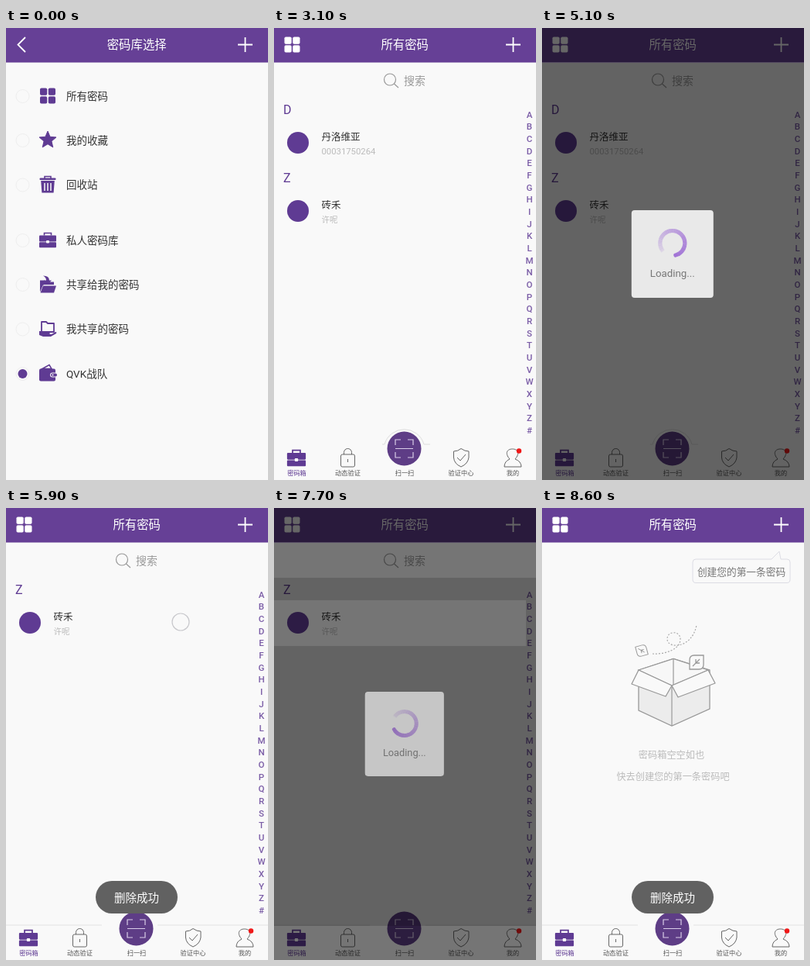
Write an HTML page that moves like this. It is 339 px wide and 583 px high and loops after 9.5 s.

```html
<!DOCTYPE html>
<html lang="zh-CN">
<head>
<meta charset="utf-8">
<title>密码库</title>
<style>
html, body { margin: 0; width: 100%; height: 100%; overflow: hidden; background: #f9f9f9; }
svg { display: block; width: 100%; height: 100%; }
text { font-family: Roboto, "Noto Sans CJK SC", "Noto Sans CJK", sans-serif; }
</style>
</head>
<body>
<svg id="stage" viewBox="0 0 339 583"></svg>
<script>
const LOOP = 9500;
const PURPLE = '#664096', INK = '#5f3b93', DARK = '#333', GREY = '#bbb';
const OPEN_SHIFT = 138, SWIPE_TIME = 437;

// Markup helpers
const text = (x, cy, size, fill, str, anchor = 'start', extra = '') =>
  `<text x="${x}" y="${cy + size * 0.365}" font-size="${size}" fill="${fill}" text-anchor="${anchor}" ${extra}>${str}</text>`;
const mid = (x, cy, size, fill, str, extra) => text(x, cy, size, fill, str, 'middle', extra);
const rect = (x, y, w, h, r, fill, extra = '') =>
  `<rect x="${x}" y="${y}" width="${w}" height="${h}" rx="${r}" fill="${fill}" ${extra}/>`;
const circle = (x, y, r, fill, extra = '') =>
  `<circle cx="${x}" cy="${y}" r="${r}" fill="${fill}" ${extra}/>`;
const line = (d, stroke, width = 1, extra = '') =>
  `<path d="${d}" fill="none" stroke="${stroke}" stroke-width="${width}" ${extra}/>`;
const shape = (d, fill, extra = '') => `<path d="${d}" fill="${fill}" ${extra}/>`;
const group = (id, body, extra = '') => `<g id="${id}" ${extra}>${body}</g>`;
const at = (x, y, body, scale = 1) => `<g transform="translate(${x} ${y}) scale(${scale})">${body}</g>`;

// Icons, each centred on the origin
const icons = {
  grid: color => [-10, 0.8].flatMap(x => [-10, 0.8].map(y => rect(x, y, 9.2, 9.2, 1.8, color))).join(''),
  star: () => {
    const points = Array.from({ length: 10 }, (_, i) => {
      const r = i % 2 ? 5.2 : 11.5, a = i * Math.PI / 5;
      return `${r * Math.sin(a)},${-r * Math.cos(a)}`;
    });
    return `<polygon points="${points.join(' ')}" fill="${INK}" stroke="${INK}" stroke-linejoin="round"/>`;
  },
  bin: () => rect(-10.5, -8.5, 21, 2.6, 1, INK) + line('M-4-8v-2.5h8v2.5', INK, 1.6) +
    shape('M-8.8-5h17.6L7.6 10.5h-15.2z', INK) + line('M-4-2V8M0-2V8M4-2V8', '#f9f9f9', 1.5),
  briefcase: () => rect(-11, -6, 22, 8, 1, INK) + rect(-11, 2.8, 22, 7, 1, INK) +
    line('M-4.5-6v-3h9V-6', INK, 1.6) + rect(-2, 0.5, 4, 3.6, 1, '#f9f9f9'),
  inbox: () => shape('M-10-5h6l2 2h10v4H-6l-4 9z', INK) + shape('M-6 2H11L8 11H-9.5z', INK) +
    line('M-5 1h14', '#f9f9f9', 0.8) + shape('M-6-11Q2-11 2-5h3L0 0-5-5h3Q-2-9-6-11z', INK),
  outbox: () => line('M-8-9h6l2 2h8V4H-8z', INK, 1.8, 'stroke-linejoin="round"') +
    shape('M-11 3h4l4 2h5q2 1 0 2h-4 7l5-3q2 0 1 2L4 10H-6l-5-2z', INK),
  wallet: () => shape('M-7-6L2-11 5-6z', 'none', `stroke="${INK}" stroke-width="1.5"`) +
    rect(-11, -6, 21, 16, 2, INK) + rect(3, -1, 9, 6, 3, '#f9f9f9') +
    rect(4, 0, 8, 4, 2, INK) + circle(6.5, 2, 1, '#f9f9f9'),
  copy: () => rect(-9.5, -10, 15, 17, 1.5, '#9172b8') +
    shape('M-5.5-6.5h15v17h-11l-4-4z', '#9172b8', 'stroke="#f9f9f9"') +
    line('M-2-2h8M-2 2h8', '#f9f9f9', 1.2),
  leaf: () => shape('M-9-3Q-9-9-3-9H9V3Q9 9 3 9H-9z', '#f9f9f9', 'stroke="#999" stroke-width="1.3"') +
    line('M-5 5L4-4M-1-4v5h5M3-3', '#999', 1.3)
};

function header(title, left) {
  return rect(0, 0, 339, 44.5, 0, PURPLE) + left + mid(169.2, 21.8, 15.4, '#fff', title) +
    line('M300 21.5h19M309.5 12v19', '#fff', 1.8);
}

function vaultPage() {
  const rows = [
    [88, 'grid', '所有密码'], [145, 'star', '我的收藏'], [202.5, 'bin', '回收站'],
    [274, 'briefcase', '私人密码库'], [331, 'inbox', '共享给我的密码'],
    [388.5, 'outbox', '我共享的密码'], [446, 'wallet', 'QVK战队']
  ];
  return rect(0, 0, 339, 583, 0, '#f9f9f9') +
    header('密码库选择', line('M25 12L15.5 21.5 25 31', '#fff', 1.8)) +
    rows.map(([y, icon, label]) =>
      circle(21.5, y, 8.5, 'none', 'stroke="#eee"') +
      at(54, y - 0.5, icons[icon](INK)) + text(78, y, 13.5, DARK, label)).join('') +
    circle(21.5, 446, 6, INK, 'id="choice"');
}

function entry(id, letter, name, account, accountSize) {
  const menu = at(364, 36, icons.copy()) + mid(364, 55, 10, '#9172b8', '拷贝') +
    at(434, 36, icons.bin(), 0.9) + mid(434, 55, 10, INK, '删除');
  return group(id, text(12, 0, 16, INK, letter) +
    group(id + 'Row', circle(31, 43, 14, INK) + text(61.5, 35, 12.5, DARK, name) +
      text(61.5, 54, accountSize, GREY, account) + group(id + 'Menu', menu)));
}

function emptyState() {
  return line('M199 66H297L307 56 309 66H317Q321 66 321 70V92Q321 96.500 317 96.500H199Q195 96.500 195 92V70Q195 66 199 66z', '#dcdce4') +
    mid(258, 82, 12.7, '#777', '创建您的第一条密码') +
    shape('M125 209L170 194.500 217 209V259L168 281 125 261z', '#ececec', 'stroke="#999" stroke-width="1.3"') +
    shape('M125 209L170 194.500 215 209 168 229z', '#f7f7f7', 'stroke="#999" stroke-width="1.3"') +
    line('M170 195V228M168 229V281', '#999', 1.2) +
    shape('M125 209L168 229 160 243 116 227z', '#f9f9f9', 'stroke="#999" stroke-width="1.3" stroke-linejoin="round"') +
    shape('M215 209L168 229 176 244 224 226z', '#f9f9f9', 'stroke="#999" stroke-width="1.3" stroke-linejoin="round"') +
    at(200, 199, icons.leaf()) +
    `<g transform="translate(129 184) rotate(75) scale(.75)">${icons.leaf()}</g>` +
    line('M143 188C158 189 179 183 179 169 179 158 162 158 162 169 162 182 194 182 200 151', '#aaa', 1.2, 'stroke-dasharray="2 2"') +
    mid(167.5, 319, 12.2, GREY, '密码箱空空如也') + mid(169.5, 347, 12.2, GREY, '快去创建您的第一条密码吧');
}

function tabBar() {
  const tab = (x, label, color = '#555') => mid(x, 574, 8.2, color, label);
  return line('M0 538H124M196 538H339', '#e2e2e2', 1, 'id="barLine"') +
    line('M140 537H143A26.500 26.500 0 0 1 194 537H202', '#ddd', 1, 'id="barArc"') +
    at(29, 554.5, icons.briefcase(), 1.1) + tab(29.5, '密码箱', INK) +
    rect(86.5, 550, 18, 16, 2, 'none', 'stroke="#666"') +
    line('M90.500 550V547.500A5 5 0 0 1 100.500 547.500V550M95.500 556v4', '#666') + tab(95.5, '动态验证') +
    circle(168.5, 542.5, 22, '#5e3d86') +
    line('M157 538V531H164M173 531H180V538M180 547V554H173M164 554H157V547M157 542.500H180', '#d9cde8', 1.2) +
    tab(169, '扫一扫') +
    line('M242 542.500Q247 546 252 546V554Q251 562 242 566 233 562 232.500 554V546Q238 546 242 542.500zM237 554l4 4 7-8', '#666') +
    tab(242, '验证中心') +
    line('M305 556C298 548 302 543 308.500 543S319 548 312 556Q320 559 320 566H298Q298 559 305 556z', '#666') +
    circle(317, 545.5, 3.2, '#f01818') + tab(309, '我的');
}

function spinner() {
  const count = 48, span = 290;
  const segments = Array.from({ length: count }, (_, i) =>
    line('M0-16A16 16 0 0 1 2.100-15.860', '#a274d6', 5.2,
      `opacity="${0.15 + 0.85 * i / count}" transform="rotate(${-span + i * span / count - 6})"`));
  return segments.join('') + circle(0, -16, 2.6, '#a274d6');
}

const indexLetters = [...'ABCDEFGHIJKLMNOPQRSTUVWXYZ#']
  .map((c, i) => mid(330.5, 111.5 + i * 15.66, 11.5, '#7a5ca6', c, 'font-weight="500"')).join('');
const panels = 'M0 44.500H339V90H0zM0 119H326V178H0zM0 539H339V583H0z';

const stage = document.getElementById('stage');
stage.innerHTML =
  rect(0, 0, 339, 583, 0, '#f9f9f9') +
  header('所有密码', at(23.5, 21.5, icons.grid('#fff'))) +
  group('list',
    circle(150, 66.5, 7.5, 'none', 'stroke="#999" stroke-width="1.2"') + line('M155.500 72L161 77', '#999', 1.2) +
    text(168, 67.5, 14, '#999', '搜索') +
    entry('first', 'D', '丹洛维亚', '00031750264', 11.3) +
    entry('second', 'Z', '砖禾', '许呢', 10.5) + indexLetters) +
  group('empty', emptyState()) + tabBar() +
  circle(0, 0, 11, 'none', 'id="touch" stroke="#c8c8cc" stroke-width="1.2"') +
  group('toast', rect(116, 481, 106, 42, 21, '#616161') + mid(169, 502.5, 14.5, '#fff', '删除成功')) +
  shape('M0 0H339V583H0z' + panels, '#000', 'id="shade" fill-rule="evenodd"') +
  shape(panels, '#000', 'id="panelShade"') +
  group('loading', rect(-53, -56.5, 106, 113, 4, '#e9e9e9') +
    at(0, -14, group('spinner', spinner())) + mid(0, 24.5, 13.3, '#777', 'Loading...')) +
  group('vault', vaultPage());

const el = Object.fromEntries([...stage.querySelectorAll('[id]')].map(node => [node.id, node]));
const clamp = v => Math.min(1, Math.max(0, v));
const ramp = (t, from, to) => clamp((t - from) / (to - from));
const set = (node, name, value) => node.setAttribute(name, value);
const fade = (node, opacity) => {
  set(node, 'opacity', opacity);
  set(node, 'display', opacity > 0 ? 'inline' : 'none');
};
const move = (node, x, y) => set(node, 'transform', `translate(${x} ${y})`);

// One deletion: swipe the row, tap delete, wait, confirm with a toast.
const deletions = [
  { row: 'first', swipe: 4150, tap: 4750, exit: 5470, toastIn: 5600, toastOut: 6200 },
  { row: 'second', swipe: 6000, tap: 6600, exit: 7670, toastIn: 7840, toastOut: LOOP }
];

function render(t) {
  fade(el.vault, 1 - ramp(t, 1450, 1580));
  set(el.choice, 'cy', t < 1300 ? 446 : 88);

  const firstGone = t >= 5590, allGone = t >= 7790;
  fade(el.list, allGone ? 0 : 1);
  fade(el.empty, allGone ? 1 : 0);
  fade(el.first, firstGone ? 0 : 1);
  move(el.first, 0, 105);
  move(el.second, 0, firstGone ? 105 : 193);
  fade(el.barLine, firstGone ? 1 : 0);
  fade(el.barArc, firstGone ? 0 : 1);

  let shade = 0, panelShade = 0, loading = 0, scale = 1, toast = 0, touch = 0;
  for (const d of deletions) {
    const pull = ramp(t, d.swipe, d.swipe + SWIPE_TIME);
    const open = pull * (1 - ramp(t, d.tap + 50, d.tap + 150));
    move(el[d.row + 'Row'], -OPEN_SHIFT * open, 0);
    fade(el[d.row + 'Menu'], open ** 1.5);

    if (t >= d.swipe - 250 && pull < 0.64) {
      touch = 1 - pull / 0.64;
      set(el.touch, 'cx', 226 - 308 * pull);
      set(el.touch, 'cy', 147 + 5 * pull);
    }
    if (t >= d.tap + 50 && t < d.exit + 120) {
      const leave = ramp(t, d.exit, d.exit + 120);
      shade = 0.6 * ramp(t, d.tap + 50, d.tap + 200);
      panelShade = leave > 0 ? 0.53 : shade;
      loading = ramp(t, d.tap + 150, d.tap + 280) * (1 - leave);
      scale = 1 - 0.14 * leave;
    }
    if (t >= d.toastIn) toast = ramp(t, d.toastIn, d.toastIn + 150) * (1 - ramp(t, d.toastOut, d.toastOut + 200));
  }
  fade(el.shade, shade);
  fade(el.panelShade, panelShade);
  fade(el.loading, loading);
  fade(el.toast, toast);
  fade(el.touch, touch);
  set(el.loading, 'transform', `translate(168.8 291.5) scale(${scale})`);
  set(el.spinner, 'transform', `rotate(${165 + (t - 5100) * 0.3058})`);
}

const start = performance.now();
function tick() {
  render((performance.now() - start) % LOOP);
  requestAnimationFrame(tick);
}
tick();
</script>
</body>
</html>
```
